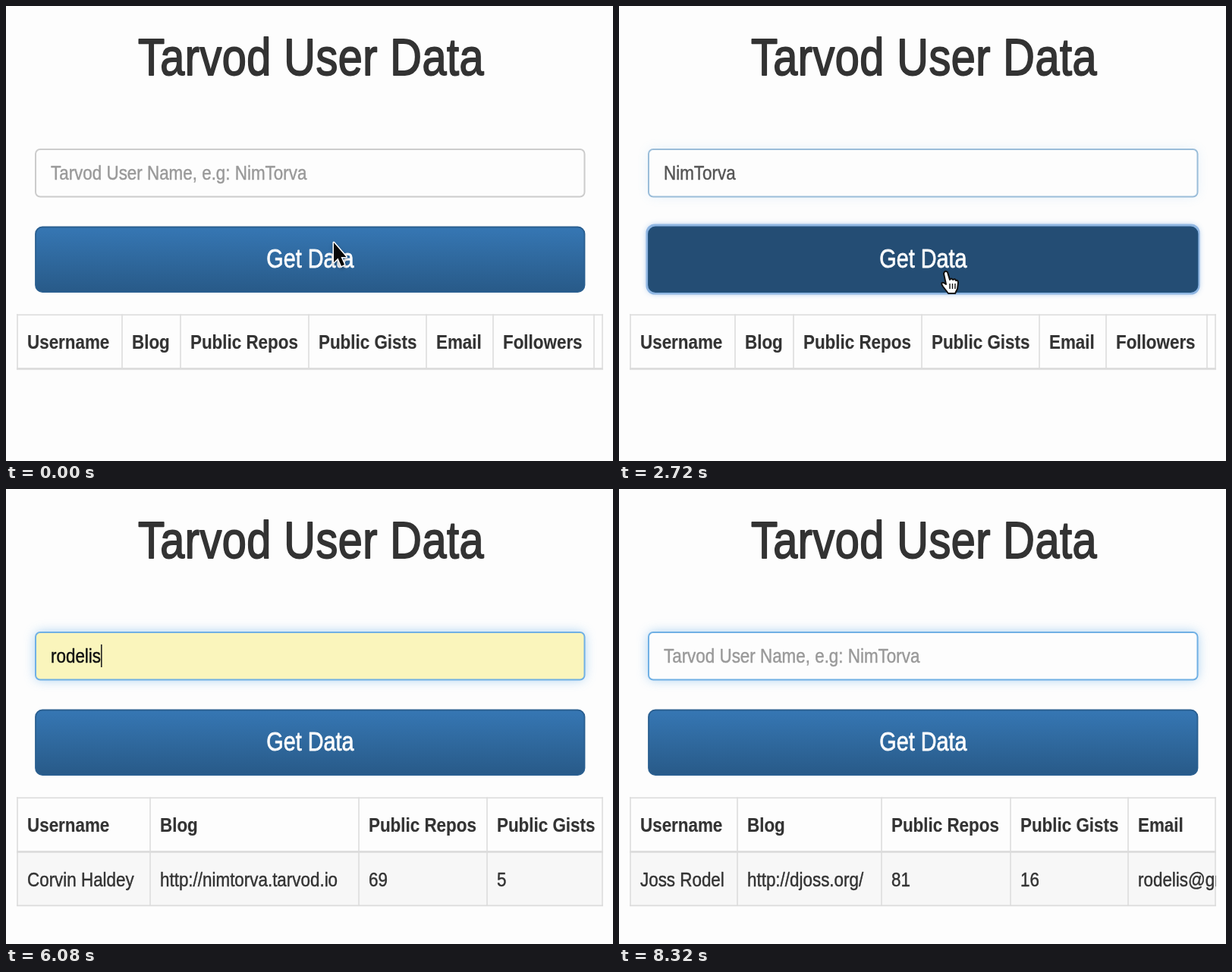
An HTML page with a canvas for the animation above (8400 ms loop, 800x600 px).

```html
<!DOCTYPE html>
<html lang="en">
<head>
<meta charset="utf-8">
<title>User Data</title>
<style>
html, body { margin: 0; width: 100%; height: 100%; overflow: hidden; background: #fdfdfd; }
canvas { display: block; }
</style>
</head>
<body>
<canvas id="stage" width="800" height="600"></canvas>
<script>
const ctx = document.getElementById('stage').getContext('2d');
const LOOP = 8400, STEP = 80;
const SX = 1.6, SY = 1.9; // the page is shown at 500 x 316 and enlarged unevenly
const SANS = '"Liberation Sans", Arial, sans-serif';
const PAPER = '#fdfdfd', INK = '#333', LINE = '#dcdcdc';

const HEADS = ['Username', 'Blog', 'Public Repos', 'Public Gists', 'Email', 'Followers'];
const TABLES = [
  { from: 0, cols: [15, 153, 230, 399, 554, 642, 775] },
  { from: 3040, cols: [15, 190, 465, 634],
    row: ['Corvin Haldey', 'http://nimtorva.tarvod.io', '69', '5'] },
  { from: 7200, cols: [15, 156, 346, 516, 671],
    row: ['Joss Rodel', 'http://djoss.org/', '81', '16', 'rodelis@gm'] }
];
const FIRST = { name: 'NimTorva', start: 1200, gap: 100, end: 3040 };
const KEYS = [4160, 4400, 4720, 5040, 5360];
const SECOND = { name: 'rodelis', fill: 5600, end: 7200 };
const FOCUS = [[680, 2650], [3680, 6670], [7600, 9000]];
const BUTTON = [[2650, 2880, 3680], [6670, 6880, 7600]]; // press, release, blur
// pointer runs: [time, x, y]
const RUNS = [
  [[0, 432, 312], [640, 443, 235], [1200, 443, 235]],
  [[2080, 443, 235], [2560, 430, 350], [3000, 430, 350], [3600, 405, 228], [4160, 405, 228]],
  [[6240, 405, 228], [6560, 433, 314], [7120, 433, 314], [7520, 443, 228], [7600, 443, 228], [7920, 815, 240]]
];

const clamp = v => Math.max(0, Math.min(1, v));
const ease = v => v * v * (3 - 2 * v);
const mix = (a, b, k) => a + (b - a) * k;

function text(str, x, y, size, color, { weight = '', align = 'left', font = SANS, stroke = 0.25, spacing = 0 } = {}) {
  ctx.save();
  ctx.translate(x, y);
  ctx.scale(SX, SY);
  ctx.font = `${weight} ${size}px ${font}`;
  ctx.letterSpacing = spacing + 'px';
  ctx.textAlign = align;
  ctx.fillStyle = ctx.strokeStyle = color;
  ctx.lineWidth = stroke;
  ctx.lineJoin = 'round';
  ctx.fillText(str, 0, 0);
  ctx.strokeText(str, 0, 0);
  const width = ctx.measureText(str).width * SX;
  ctx.restore();
  return width;
}

function box(x, y, w, h, r, fill, stroke, lw = 2) {
  ctx.beginPath();
  ctx.roundRect(x, y, w, h, r);
  if (fill) { ctx.fillStyle = fill; ctx.fill(); }
  if (stroke) { ctx.strokeStyle = stroke; ctx.lineWidth = lw; ctx.stroke(); }
}

function glow(x, y, w, h, r, color, blur) {
  ctx.save();
  ctx.shadowColor = color;
  ctx.shadowBlur = blur;
  box(x, y, w, h, r, PAPER);
  ctx.restore();
}

function focusAt(t) {
  return Math.max(...FOCUS.map(([on, off]) => clamp((t - on) / 150) * (1 - clamp((t - off) / 150))));
}

function valueAt(t) {
  if (t >= FIRST.start && t < FIRST.end)
    return FIRST.name.slice(0, 1 + Math.floor((t - FIRST.start) / FIRST.gap));
  if (t >= SECOND.fill && t < SECOND.end) return SECOND.name;
  if (t >= KEYS[0] && t < SECOND.fill) return SECOND.name.slice(0, KEYS.filter(k => k <= t).length);
  return '';
}

function caretOn(t) {
  const last = [1900, ...KEYS, SECOND.fill].filter(k => k <= t).pop() || t;
  return Math.floor((t - last) / 500) % 2 === 0;
}

function drawField(t) {
  const f = focusAt(t), value = valueAt(t), filled = value && t >= SECOND.fill;
  if (f) glow(39, 189, 723, 62, 6, `rgba(102,175,233,${0.6 * f * f})`, 15);
  const edge = `rgb(${mix(204, 112, f)},${mix(204, 176, f)},${mix(204, 228, f)})`;
  box(39, 189, 723.5, 62.5, 6, filled ? '#faf5bc' : PAPER, edge);
  if (!value) {
    text('Tarvod User Name, e.g: NimTorva', 59, 229, 14, '#999');
    return;
  }
  const w = text(value, 59, 229, 14, filled ? '#111' : '#555');
  if (f === 1 && caretOn(t)) {
    ctx.fillStyle = '#222';
    ctx.fillRect(59 + w, 205, 1.6, 30);
  }
}

function drawButton(t) {
  const state = BUTTON.find(([press, , blur]) => t >= press && t < blur);
  const p = pointer(t);
  const hover = p && t > 1200 && p.x < 763 && p.y > 291 && p.y < 377;
  const shift = state || hover ? 15 * SY : 0;
  const g = ctx.createLinearGradient(0, 291 - shift, 0, 377 - shift);
  g.addColorStop(0, '#3677b4');
  g.addColorStop(1, '#285a88');
  if (state) {
    glow(38, 290, 725, 88, 9, 'rgba(90,150,220,.8)', 8);
    box(38, 290, 725, 88, 9, null, '#8fb6e2', 5);
  }
  const pressed = state && t < state[1];
  box(39, 291.5, 723.5, 85.5, 9, pressed ? '#244d74' : g, pressed ? '#22507a' : '#2a5f90', 1.8);
  text('Get Data', 401, 345, 18, '#fdfdfd', { align: 'center', stroke: 0.4 });
}

function drawList(t) {
  if (t < KEYS[0] || t >= SECOND.fill) return;
  box(39, 252.5, 723, 48.5, 0, '#fefefe', '#b8b8bc', 1.5);
  text(SECOND.name, 44, 287, 13, '#111', { font: '"Open Sans", "Noto Sans", sans-serif', stroke: 0.4 });
}

function drawTable(t) {
  const { cols, row } = TABLES.filter(s => s.from <= t).pop();
  const bottom = row ? 549 : 478;
  ctx.save();
  ctx.beginPath();
  ctx.rect(14, 400, 773, 160);
  ctx.clip();
  if (row) {
    ctx.fillStyle = '#f7f7f7';
    ctx.fillRect(15, 478, 771, 71);
  }
  ctx.fillStyle = LINE;
  for (const x of [...cols, 786]) ctx.fillRect(x - 0.8, 406.5, 1.6, bottom - 406);
  ctx.fillRect(14, 406.5, 773, 1.6);
  ctx.fillRect(14, 477, 773, 2.8);
  if (row) ctx.fillRect(14, 548.5, 773, 1.8);
  cols.forEach((x, i) => {
    if (HEADS[i]) text(HEADS[i], x + 13, 452, 14, INK, { weight: 'bold', stroke: 0.1 });
    if (row) text(row[i], x + 13, 524, 14, INK);
  });
  ctx.restore();
}

function pointer(t) {
  const run = RUNS.find(r => t >= r[0][0] && t < r[r.length - 1][0]);
  if (!run) return null;
  const i = run.findIndex(k => k[0] > t);
  const a = run[i - 1], b = run[i];
  const k = ease((t - a[0]) / (b[0] - a[0]));
  return { x: mix(a[1], b[1], k), y: mix(a[2], b[2], k) };
}

const ARROW = new Path2D('M0 0V26L5.5 20.5 10 31 14 29 9.500 19H16.500Z');
const HAND = new Path2D('M-2 3Q-1-2 3 1L6 11Q8 8 10 11Q13 9 14 12Q17 11 17 15L16 23 13 29H4L-3 20Q-7 14-2 15L1 17Z');
const CREASES = new Path2D('M6 16V23M9.500 16V23M13 16V23');
const IBEAM = new Path2D('M-5-15Q0-15 0-11Q0-15 5-15M0-11V11M-5 15Q0 15 0 11Q0 15 5 15M-3 4H3');

function drawPointer(t) {
  const p = pointer(t);
  if (!p) return;
  const onButton = p.x < 763 && p.y > 291 && p.y < 377;
  const onField = p.x < 763 && p.y > 189 && p.y < 252;
  ctx.save();
  ctx.translate(p.x, p.y);
  ctx.lineJoin = 'round';
  if (t > 1200 && onButton) {
    ctx.fillStyle = '#fff';
    ctx.strokeStyle = '#111';
    ctx.lineWidth = 2;
    ctx.fill(HAND);
    ctx.stroke(HAND);
    ctx.lineWidth = 1.4;
    ctx.stroke(CREASES);
  } else if (t > 1200 && onField) {
    ctx.strokeStyle = '#222';
    ctx.lineWidth = 2;
    ctx.stroke(IBEAM);
  } else {
    ctx.shadowColor = 'rgba(0,0,0,.35)';
    ctx.shadowBlur = 4;
    ctx.shadowOffsetY = 2;
    ctx.strokeStyle = '#fff';
    ctx.lineWidth = 3;
    ctx.stroke(ARROW);
    ctx.shadowColor = 'transparent';
    ctx.fillStyle = '#080808';
    ctx.fill(ARROW);
  }
  ctx.restore();
}

function draw(t) {
  ctx.fillStyle = PAPER;
  ctx.fillRect(0, 0, 800, 600);
  text('Tarvod User Data', 402, 91, 36, INK, { align: 'center', stroke: 1, spacing: 0.3 });
  drawField(t);
  drawButton(t);
  drawList(t);
  drawTable(t);
  drawPointer(t);
}

const begin = performance.now();
function tick() {
  const t = (performance.now() - begin) % LOOP;
  draw(Math.floor(t / STEP) * STEP);
  requestAnimationFrame(tick);
}
tick();
</script>
</body>
</html>
```
